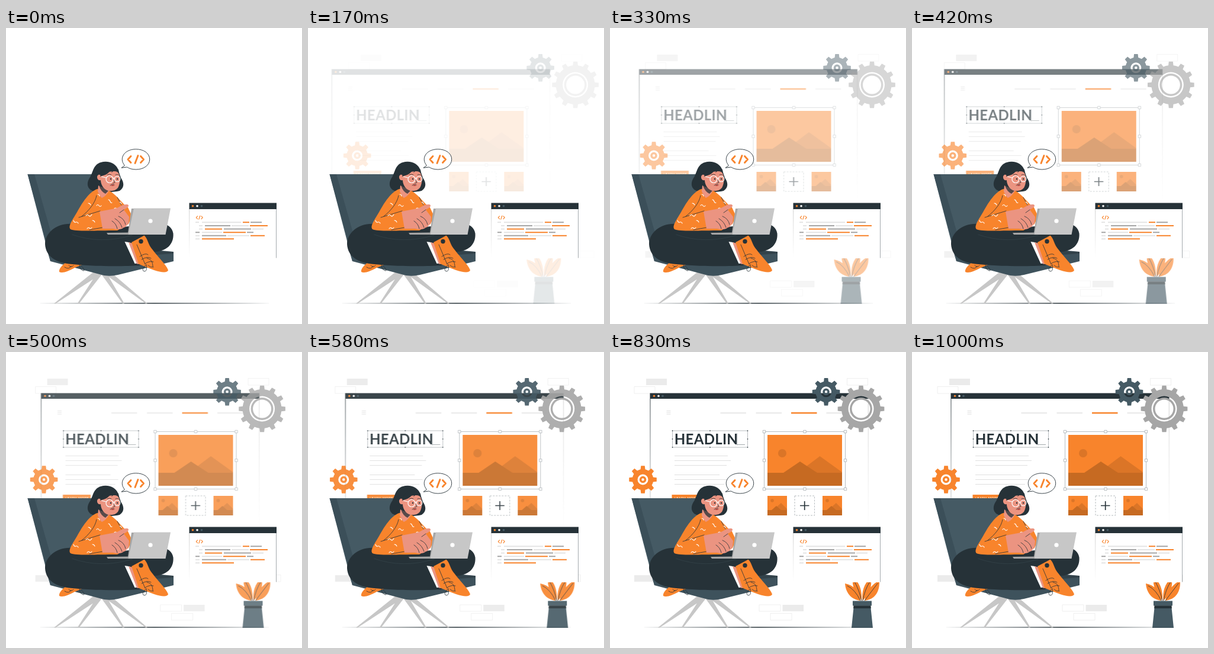
Recreate the animation shown at these times as an HTML page. Size 500 px wide and 500 px high, loop 1040 ms.

```html
<!DOCTYPE html>
<html lang="en">
<head>
<meta charset="utf-8">
<title>Web designer at work</title>
<style>
html, body { margin: 0; width: 100%; height: 100%; overflow: hidden; background: #fff; }
svg { display: block; width: 100vw; height: 100vh; }
.o { fill: #f8842c } .d { fill: #263238 } .b { fill: #455a64 } .g { fill: #c7c7c7 } .skin { fill: #eb9481 } .w { fill: #fff }
.line { fill: none; stroke: #263238; stroke-width: .8; stroke-linecap: round; stroke-linejoin: round }
.wiggle { fill: none; stroke: #fff; stroke-width: 1.1; stroke-linecap: round }
.code { fill: none; stroke: #f8842c; stroke-linecap: round; stroke-linejoin: round }
.ghost { fill: none; stroke: #e8e8e8; stroke-width: .7 }
.frame { fill: none; stroke: #9aa1a5; stroke-width: .7 }
</style>
</head>
<body>
<svg viewBox="0 0 500 500" xmlns="http://www.w3.org/2000/svg">
  <defs>
    <linearGradient id="fade" x1="0" y1="0" x2="0" y2="1">
      <stop offset="0" stop-color="#263238"/><stop offset="1" stop-color="#263238" stop-opacity="0"/>
    </linearGradient>
    <linearGradient id="faint" x1="0" y1="0" x2="0" y2="1">
      <stop offset="0" stop-color="#aaa" stop-opacity=".7"/><stop offset="1" stop-color="#aaa" stop-opacity="0"/>
    </linearGradient>
    <g id="thumb">
      <path class="o" d="M0 0h33v33H0z"/>
      <circle cx="8" cy="8" r="2.8" fill="#db7527"/>
      <path d="M14 20l9-8 10 10v2H14z" fill="#db7527"/>
      <path d="M0 24h7l8-7 8 7h10v9H0z" fill="#c66a22"/>
    </g>
  </defs>

  <g class="inLeft">
    <path fill="#ebebeb" d="M63 45h35v11H63zM43 377h35v11H43zM293.500 427h35.500v11h-35.500z"/>
    <path class="ghost" d="M43 58.500h35V70H43zM402.500 44.500h35V56h-35zM254 427h36v11h-36zM273 441.500h36V453h-36zM422.500 376.500h35V388h-35z"/>
  </g>

  <g class="inRight">
    <path class="d" d="M65.500 69.500h369V79h-369z"/>
    <circle class="o" cx="72.500" cy="74.300" r="1.700"/><circle class="w" cx="80" cy="74.300" r="1.700"/><circle class="b" cx="87" cy="74.300" r="1.700"/>
    <rect x="65.500" y="79" width=".9" height="232" fill="url(#fade)"/>
    <rect x="433.800" y="79" width=".8" height="220" fill="url(#faint)"/>
    <path d="M93.500 99.500h7M93.500 102.200h7M93.500 105h7" stroke="#ddd" stroke-width=".9"/>
    <path d="M184.500 103H228M244.500 103H288M363.500 103H407" stroke="#ebebeb" stroke-width="2.500"/>
    <path d="M304 103h43.500" stroke="#f8842c" stroke-width="2.500"/>

    <path class="frame" d="M103.500 133H230.500V161H103.500z"/>
    <path id="headHandles" fill="#263238"/>
    <text class="d" x="106.800" y="156" font-family="Lato, sans-serif" font-size="24" font-weight="700" letter-spacing=".3">HEADLIN</text>
    <path d="M212.500 137.500V157.500M213 156.500H226" fill="none" stroke="#8b9296" stroke-width=".8"/>
    <path d="M107 175.500h90M107 183.500h95M107 191.500h88M107 207.500h76M107 215.500h89M107 223.500h84" stroke="#dcdcdc" stroke-width=".9"/>
    <path class="o" d="M102.500 241h47v12h-47z"/>
    <text class="w" x="107" y="249" font-family="Lato, sans-serif" font-size="5.600" letter-spacing=".4">LEARN MORE</text>

    <path class="o" d="M264 140H390V226H264z"/>
    <circle cx="289" cy="171" r="7" fill="#db7527"/>
    <path d="M318 202L352.500 176 390 203v2h-72z" fill="#db7527"/>
    <path d="M264 204h27l28-19 29 19h42v22H264z" fill="#c66a22"/>
    <path class="frame" d="M258.500 134.500H395.500V231.500H258.500z"/>
    <path id="imageHandles" class="frame" style="fill:#fff"/>
    <use href="#thumb" x="264" y="243"/><use href="#thumb" x="357" y="243"/>
    <path class="frame" d="M310 243h33.500v33H310z" stroke-dasharray="3 2"/>
    <path d="M319 259.500h15.500M326.700 252v15" stroke="#263238" stroke-width="1.700"/>

    <path class="o" d="M421 420C404 418 396 405 395 391 410 394 419 404 421 420zM423 420C413 407 405 394 409 383 420 388 424 404 423 420zM424.500 420C423 405 427 391 438 382 442 395 436 410 424.500 420zM428 420C432 402 441 392 453 386 454 406 445 418 428 420z"/>
    <path class="line" d="M421 420Q412 401 399 395M423 420Q419 402 411 388M425 420Q428 402 437 388M428 420Q440 404 450 391" stroke-width=".5"/>
    <path class="b" d="M408 420.500h32v8h-32zM409.500 432h29l3.500 34h-36z"/>
    <path class="d" d="M409.500 428.300h29l.4 4.700h-29.800z"/>
  </g>

  <g class="inLeft" id="gears" fill-rule="evenodd"></g>

  <path class="d" d="M50 465L251 464.300 452 465 251 465.700z"/>

  <g id="chair">
    <path class="g" d="M148 412l12 4L84 465.500h-3zM153 415h10l-39.500 50.500h-3zM161 416h10l29 49.500h-3zM166 415h14l59 50.500h-3z"/>
    <path class="b" d="M36.500 247H165L190 380 75 394z"/>
    <path d="M36.500 247H48L80 360 73 380z" fill="#3b4f59"/>
    <path d="M69 374L262 376 283 378V394L189 417Q172 421 158 416L75 394z" fill="#3e525c"/>
    <path class="d" d="M240 376L283 378V381L240 384z" opacity=".5"/>
  </g>

  <g id="feet">
    <path class="o" d="M101 396C93 402 89 408 90 412 95 415 105 411 116 405L131 399 124 393z"/>
    <path class="line" d="M99 404q8 5 11-2M106 401q4 5 8 0M124 400c0 6 4 10 7 10s-1-6-5-9"/>
  </g>
  <path class="d" d="M112 331C86 329 66 346 66 365 67 385 83 397 112 399 150 403 198 403 226 401L208 362 246 378C270 379 284 366 282.500 347 281 337 273 331 260 329L190 337z"/>
  <path class="line" d="M112 349Q160 366 213 350" style="stroke:#34434a"/>
  <path class="w" d="M200.500 361l7 1 15 35.500-5 .5z"/>
  <path class="skin" d="M207 362l7 2 11 35-4-.5z"/>
  <path class="o" d="M212 362L233.500 350.500C240 356 239 365 248 375 256 386 270 399 274 409 273 414 262 413 250 409 240 405 231 402 224 398.500z"/>
  <circle class="d" cx="228" cy="360.500" r="3.700"/>
  <path class="line" d="M221 366l14 33M226 386q10-7 14-3M229 391q10-6 16-2M235 398q7-5 14-3M238 389c8 1 10 8 10 14M237 400c-5 3-8 9-4 11 5 1 5-6 4-11M240 401q4 4 9 3" stroke-width="1"/>

  <g id="girl">
    <path class="d" d="M190 241C187 229 173 223 160 227 147 231 147 244 142 252 134 263 138 275 151 276 165 277 181 278 192 275 201 269 199 260 194 253z"/>
    <path class="o" d="M154 272C140 277 129 295 120 311 113 323 104 335 109 340 118 344 150 342 188 342L207 331 213 318 206 303C197 298 188 282 173 274z"/>
    <path class="skin" d="M156 266L155 276Q159 285 162 287 169 284 174 275z"/>
    <path class="d" d="M157 266l16 9-5 5q-8-4-11-14z" opacity=".75"/>
    <path class="skin" d="M162 246C170 245 179 240 189 243 194 252 193 263 189 270 184 276 174 277 167 272 162 268 160 261 160 257 154 259 152 250 156 248 159 247 160 249 161 251z"/>
    <path class="d" d="M159 251C161 241 167 236 174 231L190 239 191 246C185 240 182 240 178 245 180 241 179 239 177 239 174 246 167 249 161 250z"/>
    <g fill="none" stroke="#fff" stroke-width="1.200">
      <circle cx="175" cy="255.500" r="6"/><circle cx="188" cy="255" r="4.700"/><path d="M161 251l8 2M181 254q1-1 2 0"/>
    </g>
    <path class="line" d="M171 248q4-2 7 0M185 248q3-1 5 0M182 257l2 4-3 1M176 266q4-4 7-1" stroke-width="1"/>
    <circle class="d" cx="177" cy="255" r="1.200"/><circle class="d" cx="188" cy="255" r="1.200"/>
    <path d="M177 266q4-3 6 0-3 2-6 0z" fill="#b94a43"/>
    <path class="line" d="M153 283C151 295 140 309 128 318M123 320L159 309M141 341L163 337M188 286l7 13"/>
    <path class="wiggle" d="M153 300q2-3 4 0t4 0M173 290q2 0 3 3t3 2M139 296q3 0 4 3M114 325q1 4 4 3t4 2M135 317q3-3 5 0t5-2M137 339q2-3 4-1t4-1M183 305q2-2 4 0M146 325q3 0 4 3M155 281q3 0 3 3M192 294q2 0 3 3"/>
    <path class="skin" d="M158 310L184 305C192 303 197 297 205 298 210 300 205 304 199 307L208 319 207 330C203 333 203 337 199 337 195 341 187 341 181 339L163 339z"/>
    <path class="line" d="M190 318q10 4 12 14M184 322q9 5 12 15M179 326q7 4 9 13M199 307l-7 5"/>
  </g>

  <g id="laptop">
    <path d="M170 346L206 345.500 212 305H217L209 349H172z" fill="#a6a6a6"/>
    <path class="g" d="M216 304.500H278L269.500 349H206.500z"/>
    <circle class="w" cx="244" cy="326" r="3.600"/>
  </g>

  <g id="bubble">
    <path class="w" stroke="#263238" stroke-width=".9" stroke-linejoin="round" d="M200.500 232.300C190 220 200 204.700 219.500 204.700 233 204.700 242.700 212 242.700 221.800S233 239 219.500 239C213 239 208 237.300 204.500 235L195 236.200z"/>
    <path class="code" stroke-width="2.900" d="M211 216.500L206 222l5 5.500M223 215.500L218 228.500M227.500 216.500L232.500 222l-5 5.500"/>
  </g>

  <g id="panel">
    <path class="w" d="M309.500 295.500H457V389H309.500z"/>
    <rect x="309.300" y="305" width=".8" height="82" fill="url(#faint)"/>
    <path d="M456.500 305V388.500" stroke="#8d9498" stroke-width=".8"/>
    <path class="d" d="M309.500 295.500H457V306H309.500z"/>
    <circle class="o" cx="315.500" cy="300.700" r="1.800"/><circle class="w" cx="323" cy="300.700" r="1.800"/><circle class="b" cx="330.500" cy="300.700" r="1.800"/>
    <path class="code" stroke-width="1.200" d="M323.500 317.800L321.300 320.200l2.200 2.400M327.800 317.300l-2 5.800M330 317.800l2.200 2.400-2.200 2.400"/>
    <g id="codeLines" stroke-width="2"></g>
  </g>
</svg>

<script>
const $ = id => document.getElementById(id);
const SVG = 'http://www.w3.org/2000/svg';

function add(parent, tag, attrs) {
  const node = document.createElementNS(SVG, tag);
  for (const key in attrs) node.setAttribute(key, attrs[key]);
  parent.appendChild(node);
}

const circlePath = (x, y, r) => `M${x - r} ${y}a${r} ${r} 0 1 0 ${2 * r} 0a${r} ${r} 0 1 0 ${-2 * r} 0z`;

// A toothed disc; each further radius alternates hole and ring.
function gear(x, y, outer, body, teeth, fill, radii) {
  const at = (r, a) => `${(x + r * Math.sin(a)).toFixed(2)} ${(y - r * Math.cos(a)).toFixed(2)}`;
  const half = body > 25 ? 4.3 : 4;
  let d = '';
  for (let i = 0; i < teeth; i++) {
    const a = i * 2 * Math.PI / teeth, base = half / body, tip = (half - .8) / outer;
    d += `${i ? `A${body} ${body} 0 0 1 ` : 'M'}${at(body, a - base)}L${at(outer, a - tip)} ${at(outer, a + tip)} ${at(body, a + base)}`;
  }
  d += `A${body} ${body} 0 0 1 ${at(body, -half / body)}z` + radii.map(r => circlePath(x, y, r)).join('');
  add($('gears'), 'path', { d, fill });
}
gear(367, 67.3, 23.5, 17.8, 8, '#455a64', [9, 5.8, 2.2]);
gear(426, 96, 39.5, 33, 12, '#a6a6a6', [21.5, 19, 15.5]);
gear(57.5, 215.5, 23.5, 17.8, 8, '#f8842c', [9, 5.8, 2.2]);

// Square grips on the corners and edge middles of a box.
function handles(id, [x0, x1], [y0, y1], size) {
  let d = '';
  for (const i of [0, 1, 2]) for (const j of [0, 1, 2]) {
    if (i === 1 && j === 1) continue;
    const x = x0 + (x1 - x0) * i / 2 - size / 2, y = y0 + (y1 - y0) * j / 2 - size / 2;
    d += `M${x} ${y}h${size}v${size}h${-size}z`;
  }
  $(id).setAttribute('d', d);
}
handles('headHandles', [103.5, 230.5], [133, 161], 1.4);
handles('imageHandles', [258.5, 395.5], [134.5, 231.5], 4.4);

// Each row: y, then segments of colour key, start and end.
const inks = { l: '#e4e4e4', g: '#a6a6a6', o: '#f8842c' };
[
  '328.2 l320-326 l331-397 o400-411 g413-432',
  '334 l326-332 g336-379 l381-410 o412-442',
  '339.6 l326-332 o336-365 g368-414 l416-435',
  '345.2 g320-327 l331-365 o367-405 g407-418',
  '350.8 l320-327 g331-372 l374-411 o413-437',
  '356.3 l320-327 o331-385'
].forEach(row => {
  const [y, ...parts] = row.split(' ');
  for (const part of parts) {
    const [from, to] = part.slice(1).split('-');
    add($('codeLines'), 'path', { d: `M${from} ${y}H${to}`, stroke: inks[part[0]] });
  }
});

const LOOP = 1040, STEPS = 25, STEP = 1000 / 24, SLIDE = 30;
const bezier = (u, a, b) => 3 * a * u * (1 - u) ** 2 + 3 * b * u * u * (1 - u) + u ** 3;

// cubic-bezier(.36, -.01, .5, 1.38)
function ease(x) {
  let low = 0, high = 1;
  for (let i = 0; i < 24; i++) {
    const mid = (low + high) / 2;
    if (bezier(mid, .36, .5) < x) low = mid; else high = mid;
  }
  return bezier(high, -.01, 1.38);
}

const fromLeft = document.querySelectorAll('.inRight');
const fromRight = document.querySelectorAll('.inLeft');

function draw(ms) {
  const step = Math.min(STEPS - 1, Math.floor((ms % LOOP + 5.01) / STEP));
  const eased = ease((step + 1) / STEPS);
  const opacity = step < 2 ? 0 : Math.min(1, eased);
  const place = (nodes, x) => nodes.forEach(node => {
    node.setAttribute('transform', `translate(${x.toFixed(3)} 0)`);
    node.setAttribute('opacity', opacity);
  });
  place(fromLeft, SLIDE * (eased - 1));
  place(fromRight, SLIDE * (1 - eased));
}

const start = performance.now();
function tick() {
  draw(performance.now() - start);
  requestAnimationFrame(tick);
}
tick();
</script>
</body>
</html>
```
